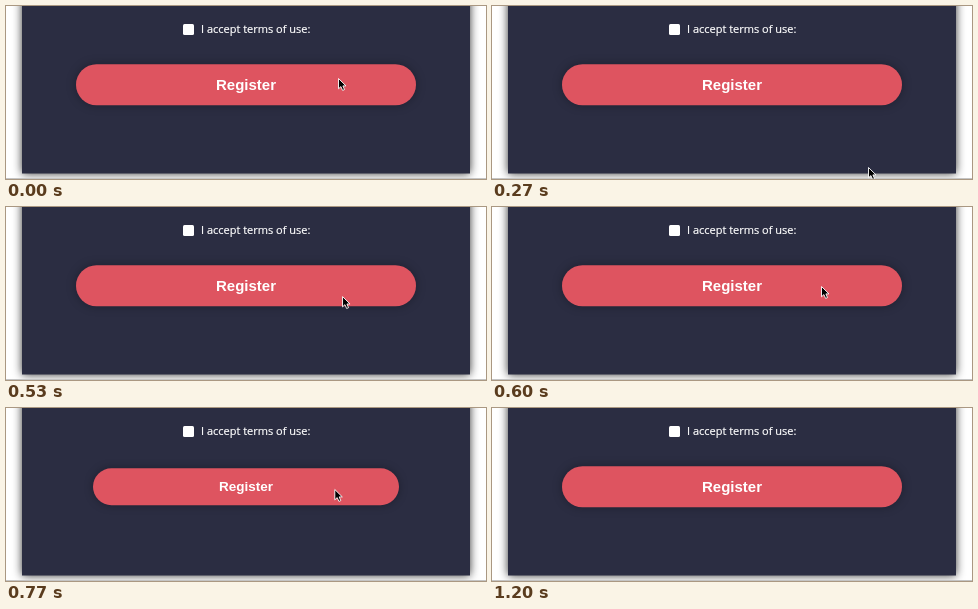
Animation of 480 by 173 pixels, one loop 1370 ms. Source, as an HTML page:

```html
<!DOCTYPE html>
<html lang="en">
<head>
<meta charset="utf-8">
<title>Register button</title>
<style>
  html, body { margin: 0; width: 100%; height: 100%; overflow: hidden; background: #fff; }
  svg { display: block; width: 100%; height: 100%; }
  text { fill: #fff; }
  .panel { fill: #2b2d42; filter: drop-shadow(0 0 5px rgba(0, 0, 0, .8)); }
  .label { font: 11px "Open Sans", sans-serif; stroke: #fff; stroke-width: .2px; }
  .pill { fill: #de5460; filter: drop-shadow(0 0 5px rgba(0, 0, 0, .3)); }
  .caption { font: bold 15px "Liberation Sans", Arial, sans-serif; text-anchor: middle; }
</style>
</head>
<body>
<svg viewBox="0 0 480 173">
  <rect class="panel" x="16" y="-40" width="448" height="207.5"/>
  <rect y="172" width="480" height="1" fill="#c4c4c4"/>
  <rect x="177" y="18" width="11" height="11" rx="1.5" fill="#fff"/>
  <text class="label" x="195" y="27">I accept terms of use:</text>
  <g id="button">
    <rect class="pill" x="-170" y="-20.5" width="340" height="41" rx="20.5"/>
    <text class="caption" y="5.3">Register</text>
  </g>
  <path id="cursor" d="M.5 .5V10.8L2.9 8.6 4.6 12.4 6.5 11.6 4.9 7.9H8Z"
        fill="#000" stroke="#fff" stroke-width=".9" stroke-linejoin="round"/>
</svg>
<script>
const LOOP = 1370;
const button = document.getElementById("button");
const cursor = document.getElementById("cursor");

const linear = u => u;
const easeOut = u => 1 - (1 - u) ** 2;
const smooth = u => u * u * (3 - 2 * u);

// Keys: tick (30 per second), easing from the previous key, values
const pointerKeys = [
  [0, linear, 332, 72],
  [4, linear, 332, 83],
  [8, smooth, 376, 161],
  [12, linear, 376, 161],
  [13, linear, 373, 142],
  [18, easeOut, 329, 79],
  [22, linear, 328.3, 81],
  [34, linear, 328.3, 81],
  [35, linear, 327, 90]
];
const scaleKeys = [
  [0, linear, 1],
  [20, linear, 1],
  [23, smooth, 0.9],
  [27, linear, 0.9],
  [28, linear, 0.976],
  [30, easeOut, 1]
];

function sample(keys, tick) {
  const next = keys.findIndex(key => key[0] > tick);
  if (next < 0) return keys[keys.length - 1].slice(2);
  const [start, , ...from] = keys[next - 1];
  const [end, ease, ...to] = keys[next];
  const u = ease((tick - start) / (end - start));
  return from.map((value, i) => value + (to[i] - value) * u);
}

function draw(now) {
  const time = Math.floor(now % LOOP / 10) * 10;
  const tick = Math.floor((time + 4) * 0.03);
  const [x, y] = sample(pointerKeys, tick);
  const [scale] = sample(scaleKeys, tick);
  button.setAttribute("transform", `translate(240 78.7) scale(${scale})`);
  cursor.setAttribute("transform", `translate(${x} ${y})`);
  cursor.setAttribute("visibility", tick < 36 ? "visible" : "hidden");
}

const origin = performance.now();
function loop() {
  draw(performance.now() - origin);
  requestAnimationFrame(loop);
}
loop();
</script>
</body>
</html>
```
